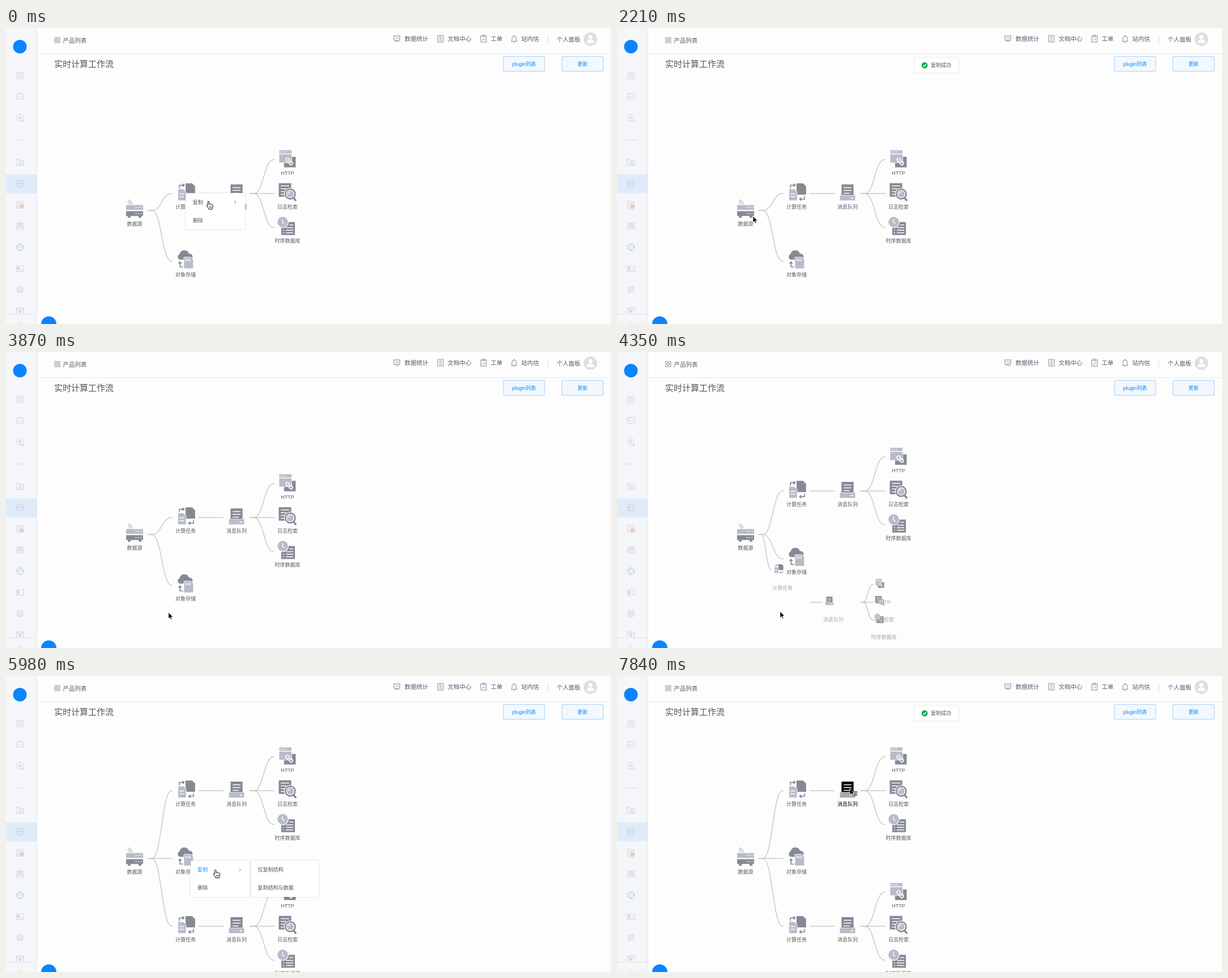
Write an HTML page that moves like this. It is 1068 by 524 pixels and loops after 7.99 s.

```html
<!DOCTYPE html>
<html>
<head>
<meta charset="utf-8">
<title>实时计算工作流</title>
<style>
  html, body { margin: 0; width: 100%; height: 100%; overflow: hidden; background: #fdfdfd; }
  svg { display: block; width: 100%; height: 100%; }
  text { font-family: "Liberation Sans", "Noto Sans CJK SC", "Noto Sans CJK", sans-serif; }
  .node { color: #858994; --light: #b8bcc9; fill: #5a5a5a; }
  .node.hot { color: #000; --light: #a4a8b5; fill: #000; }
  .d { fill: currentColor; }
  .l { fill: var(--light); }
  .dl { fill: none; stroke: currentColor; stroke-width: 1.7; }
  .ll { fill: none; stroke: var(--light); stroke-width: 1.6; stroke-linecap: round; }
  .wl { fill: none; stroke: #fff; stroke-width: 1.5; }
  .thick { stroke-width: 3.4; }
  .ring { stroke-width: 2.5; }
  .edge { stroke: #fdfdfd; stroke-width: .8; }
  .link { fill: none; stroke: #cacaca; stroke-width: 1.5; }
  .side, .head { fill: none; stroke: #c3c7d0; stroke-width: .75; }
  .head { stroke: #757b8b; stroke-width: .9; }
  .warm { stroke: #e59a80; }
  .green { stroke: #8fc79b; }
  .white { fill: #fff; }
  .panel { fill: #fff; filter: drop-shadow(0 .7px 1.8px rgba(0, 0, 0, .17)); }
  .item { fill: #555; stroke: #555; }
  .item text { stroke: none; }
  .item.on { fill: #1890ff; stroke: #1890ff; }
</style>
</head>
<body>
<svg id="stage" viewBox="0 0 1068 524" xmlns="http://www.w3.org/2000/svg"></svg>
<script>
const LOOP = 7990;
const stage = document.getElementById('stage');

const text = (x, cy, s, size = 9, fill = '', extra = '') =>
  `<text x="${x}" y="${cy + size * .37}" font-size="${size}" ${fill && `fill="${fill}"`} ${extra}>${s}</text>`;
const mid = 'text-anchor="middle"';
const rect = (x, y, w, h, attrs = '') => `<rect x="${x}" y="${y}" width="${w}" height="${h}" ${attrs}/>`;
const circle = (x, y, r, attrs = '') => `<circle cx="${x}" cy="${y}" r="${r}" ${attrs}/>`;
const path = (d, cls = '') => `<path d="${d}" class="${cls}"/>`;
const at = (x, y, cls, body) => `<g transform="translate(${x} ${y})" class="${cls}">${body}</g>`;

// ---------- static page ----------
const sideIcons = [
  [84, circle(-3, -3.2, 2.7) + rect(1.3, -6, 5, 5, 'rx="1"') + rect(-6, 1.3, 5, 5, 'rx="1"') + circle(3.8, 3.8, 2.6)],
  [121, rect(-6.5, -4.5, 13, 9.5, 'rx="1"') + path('M-2-6.5V-4.5M2-6.5V-4.5M-4 2L-2.5-1-1 2M1 0H4')],
  [159, circle(-.5, -.5, 6) + path('M4 4L7 6H1') + path('M1-2.5Q-2-3.5-1.5-1T1 .5-2 2', 'warm')],
  [238, path('M-6.5 5.5V-5.5H-2L-.5-3.5H6.5V5.5ZM-4-1H4M-3 1.5H4M-3 3.5H4')],
  [275.5, path('M-5-2V-5.5H5V-2M-5 2V5.5H5V2M-6.5-1.5H-2.5V1.5H-6.5ZM2.5-1.5H6.5V1.5H2.5ZM-2 0H2M-2-5.5V-3.5M2 5.5V3.5')],
  [313, path('M2 6H-6V-6H5V-1M-3.5-3H3M-3.5 0H0M-3.5 3H-1') + `<g class="warm">${circle(3, 3, 3.3, 'fill="#f6dcd2"')}${path('M3 1V3H5')}</g>`],
  [350.5, path('M-6.5 0V5.5H6.5V0M-5.5 0V-5.5H5.5V0M-6.5 2H-2L-1 3.5H1L2 2H6.5') + rect(-2.5, -3.5, 5, 3.5, 'class="warm"')],
  [388, `<g class="green">${circle(0, 0, 6)}${path('M-5.5-2Q-1-1-2 1T1 5.5M0-6Q-1-2 2-2T5.5 1')}</g>`],
  [426, rect(-6.5, -5, 13, 10) + path('M0 2H4') + `<g class="warm">${circle(-3, -1, 1.2, 'fill="#e59a80"')}${path('M-5 2.5H-2')}</g>`],
  [463, rect(-4.5, -4.5, 9, 9, 'rx="1"') + rect(-2, -2, 4, 4) + path('M-2.5-4.5V-6.5M2.5-4.5V-6.5M-2.5 4.5V6.5M2.5 4.5V6.5M-4.5-2.5H-6.5M-4.5 2.5H-6.5M4.5-2.5H6.5M4.5 2.5H6.5')],
  [501, path('M-6 5.5V-5.5H6V5.5M-6-3H6') + path('M-1-1.2L2 .8-1 2.8Z', 'warm')]
];

const headIcons = [
  [90.5, 21.5, [[-4.8, -4.8], [.8, -4.8], [-4.8, .8], [.8, .8]].map(([x, y]) => rect(x, y, 4, 4, 'rx="1"')).join('')],
  [690, 19, path('M-6-5H6M-5-5V3H5V-5M-2.5 0L-.5-2 1 0 3-2M0 3L-3 6M0 3L3 6')],
  [767, 19, rect(-5, -6, 10, 12, 'rx=".5"') + path('M-2.5-3H2.5M-2.5 0H2.5M-2.5 3H2.5')],
  [843, 19, path('M-2-5H-5V6H5V-5H2M-2-6.5H2V-3.5H-2ZM-2.5 1L-.5 3 3-1')],
  [897, 19.5, path('M-5 4H5L3.8 2V-1.5A3.8 3.8 0 0 0-3.8-1.5V2ZM0-7V-5.5M-1.5 6H1.5')]
];
const headLabels = [[703.5, '数据统计'], [779.5, '文档中心'], [855.5, '工单'], [909.5, '站内信']];

const button = (x, label) => rect(x, 50.4, 73, 26.3, 'rx="1.5" fill="#f2f8fe" stroke="#8fc6fb" stroke-width=".8"')
  + text(x + 36.5, 63.3, label, 9, '#0a84ff', mid + ' font-weight="500"');

const page = rect(0, 0, 1068, 524, 'fill="#fdfdfd"')
  + rect(0, 0, 54, 524, 'fill="#f4f6fa"') + rect(0, 259, 54, 33.5, 'fill="#dfebf9"')
  + rect(54, 0, 1, 524, 'fill="#e3e7ee"') + rect(55, 45, 1013, 1, 'fill="#e6e8ed"')
  + circle(24.5, 33, 12, 'fill="#0a84ff"')
  + sideIcons.map(([y, body]) => at(24.7, y, 'side', body)).join('')
  + rect(14, 197.7, 22, 1, 'fill="#dadde4"')
  + rect(0, 506, 54, 18, 'fill="#f4f6fa"') + rect(0, 506, 54, 1, 'fill="#dfe3ea"')
  + path('M21 521L24 524M25 521L28 524', 'side')
  + circle(75.5, 524, 13.5, 'fill="#0a84ff"')
  + headIcons.map(([x, y, body]) => at(x, y, 'head', body)).join('')
  + text(100.5, 21.8, '产品列表', 10.5, '#555b6c')
  + headLabels.map(([x, s]) => text(x, 18.8, s, 10.5, '#555b6c')).join('')
  + rect(956, 14, 1, 12, 'fill="#d5d8de"') + text(972, 19.8, '个人面板', 10.5, '#555b6c')
  + circle(1031.7, 19.7, 12, 'fill="#dedede"') + circle(1031.7, 16, 3.6, 'fill="#fff"')
  + path('M1024.5 26.5Q1025 20.5 1031.7 20.5T1039 26.5Z', 'white')
  + text(85, 63.4, '实时计算工作流', 15, '#555')
  + button(878, 'plugin列表') + button(981.3, '更新');

// ---------- workflow nodes ----------
const icons = {
  source: path('M-11.5-18.5A8 8 0 0 1-4.5-11.5M-11.5-14.8A4.5 4.5 0 0 1-8-11', 'll')
    + rect(-15, -9.5, 30, 8.5, 'class="l" rx=".7"') + rect(-15, 1.2, 30, 8.6, 'class="d" rx=".7"')
    + rect(-12, 9.5, 5, 3.3, 'class="d"') + rect(7, 9.5, 5, 3.3, 'class="d"')
    + [-5.2, 5.5].map(y => path(`M1.5 ${y}h2M6 ${y}h2M10.5 ${y}h2`, 'wl')).join(''),
  task: path('M0-18H11.5L16.8-12.7V2H0Z', 'd') + path('M-13.5-8H-4L1-3V12.5H-13.5Z', 'l edge')
    + path('M-11 .5H-2.5M-11 5.5H-2.5', 'wl')
    + path('M-10.8-9.5V-14.7H-5M14 4.8V10H8', 'dl') + path('M-5.5-18.3L-1-14.7-5.5-11.2ZM8.5 6.5L4 10 8.5 13.5Z', 'd'),
  queue: path('M-11 0H11L13.5 4.5V12.2H-13.5V4.5Z', 'l') + rect(-11, -16.5, 22, 19.5, 'class="d edge"')
    + path('M-7-10.5H7M-7-5.5H7M-7-.5H4M5 8H10', 'wl'),
  http: rect(-6.2, -5, 20.6, 18.6, 'class="d"') + rect(-15, -17, 22.3, 22.8, 'class="l edge"')
    + path('M-12.5-13.5h2M-8.5-13.5h2M-4.5-13.5h2M-15-10H7', 'wl')
    + `<g transform="translate(3 3.5) rotate(45) scale(1.1)">${path('M-1-2.5H-4A2.5 2.5 0 0 0-4 2.5H0M1 2.5H4A2.5 2.5 0 0 0 4-2.5H0M-2.5 0H2.5', 'wl')}</g>`,
  log: rect(-15.5, -18.3, 22, 24, 'class="d"') + path('M-12-13.5H3M-12-8.5H-2M-12-3.5H-5M-12 1.5H-6', 'wl')
    + circle(4.8, .8, 10.9, 'fill="#fdfdfd"') + path('M10.5 7.5L15 13', 'dl thick')
    + circle(4.8, .8, 8.6, 'class="dl ring"') + circle(4.8, .8, 6, 'class="l"')
    + path('M1.3 .5A3.5 3.5 0 0 1 4.8-3', 'wl'),
  db: rect(-11, -9.5, 24, 23, 'class="d"') + path('M-8 .5h2M-3 .5H10M-8 5h2M-3 5H10M-8 9.5h2M-3 9.5H10M3-4.5H10', 'wl')
    + circle(-8.5, -9.5, 10.5, 'fill="#fdfdfd"') + circle(-8.5, -9.5, 9.3, 'class="l"') + path('M-8.8-14.5V-9L-5.5-6.5', 'wl'),
  store: path('M-10-3A5 5 0 0 1-10.5-12.5A8.5 8.5 0 0 1 6-13.5A5.3 5.3 0 0 1 8-3Z', 'd')
    + path('M-3-7.5H9.5L13.8-3V13H-3Z', 'l edge')
    + path('M.8-4.5V0M4.3-4.5V0M7.8-4.5V0', 'wl')
    + path('M-9.8 2V10H-4.5', 'dl') + path('M-13.3 4L-9.8-.3-6.3 4Z', 'd')
};

// x, y before, y after; a node with a birth point [x, y] grows out of it
const nodes = [
  { icon: 'source', label: '数据源', x: 227, y: 323, to: 323 },
  { icon: 'task', label: '计算任务', x: 317, y: 293, to: 203 },
  { icon: 'store', label: '对象存储', x: 317, y: 413, to: 323 },
  { icon: 'queue', label: '消息队列', x: 407, y: 293, to: 203 },
  { icon: 'http', label: 'HTTP', x: 497, y: 233, to: 143 },
  { icon: 'log', label: '日志检索', x: 497, y: 293, to: 203 },
  { icon: 'db', label: '时序数据库', x: 497, y: 353, to: 263 },
  { icon: 'task', label: '计算任务', x: 317, to: 443, birth: [265, 339] },
  { icon: 'queue', label: '消息队列', x: 407, to: 443, birth: [355, 457] },
  { icon: 'http', label: 'HTTP', x: 497, to: 383, birth: [443, 457] },
  { icon: 'log', label: '日志检索', x: 497, to: 443, birth: [443, 457] },
  { icon: 'db', label: '时序数据库', x: 497, to: 503, birth: [443, 457] }
];
const links = [[0, 1], [0, 2], [1, 3], [3, 4], [3, 5], [3, 6], [0, 7], [7, 8], [8, 9], [8, 10], [8, 11]];

// ---------- menus ----------
const copyItems = ['复制>', '删除'];
const copyKinds = ['仅复制结构', '复制结构与数据'];
const panels = [
  { x: 317.5, y: 292.2, w: 104.3, h: 64, items: copyItems, show: [0, 1290], on: [[150, 0]] },
  { x: 424, y: 292.2, w: 120.3, h: 64, items: copyKinds, show: [290, 1290], on: [[700, 0], [950, 1]] },
  { x: 233, y: 323.3, w: 103.8, h: 158, items: ['导出任务>', '计算任务', '查看数据', '复制>', '粘贴'], show: [2500, 3570], on: [[2600, 0], [3200, 3], [3350, 4]] },
  { x: 339.3, y: 323.3, w: 118, h: 124, items: ['导出至 HTTP', '导出至日志检索服务', '导出至时序数据库', '导出至对象存储'], show: [2640, 3200], on: [] },
  { x: 326, y: 327, w: 104, h: 64, items: copyItems, show: [5680, 7190], on: [[5800, 0]] },
  { x: 432.3, y: 327, w: 120.3, h: 64, items: copyKinds, show: [5900, 7190], on: [[6300, 0], [6700, 1]] }
];
const panelMarkup = ({ x, y, w, h, items }) => {
  const step = h / items.length;
  const rows = items.map((s, i) => {
    const cy = y + step * (i + .5);
    const arrow = s.endsWith('>') ? `<path d="M${x + 85.5} ${cy - 2.7}l2.8 2.7-2.8 2.7" fill="none" stroke-width=".9"/>` : '';
    return `<g class="item">${text(x + 12.3, cy, s.replace('>', ''))}${arrow}</g>`;
  });
  return `<g class="menu">${rect(x, y, w, h, 'rx="2" class="panel"')}${rows.join('')}</g>`;
};

const toastMarkup = `<g id="toast">${rect(526, 53, 77, 26, 'rx="2" class="panel"')}${circle(543, 66, 5.4, 'fill="#10ab55"')}
  ${path('M540.5 66L542.3 67.9 545.7 64.3', 'wl')}${text(554, 66, '复制成功', 9, '#555')}</g>`;

// ---------- cursors: time, x, y, shape from that time on ----------
const cursorKeys = [
  [0, 357.7, 306.8, 'hand'], [150, 359, 307, 'hand'], [450, 395, 308, 'hand'], [730, 440, 311, 'hand'],
  [1000, 473.3, 337.2, 'hand'], [1290, 473.3, 337.2, 'arrow'], [2210, 240, 333, 'arrow'],
  [2360, 233, 324, 'context'], [2500, 233, 324, 'hand'], [2650, 252, 340, 'hand'], [2795, 275, 365, 'hand'],
  [3080, 283, 422, 'hand'], [3110, 283, 422, 'hand'], [3280, 285, 452, 'hand'],
  [3430, 286.4, 461.6, 'hand'], [3570, 286.4, 461.6, 'arrow'], [4490, 288, 459, 'arrow'],
  [4930, 325, 328.3, 'context'], [5680, 326, 328, 'hand'], [5960, 369.8, 343.3, 'hand'], [6115, 369.8, 343.3, 'hand'],
  [6600, 468, 347, 'hand'], [6750, 478, 364, 'hand'], [6900, 482, 371, 'hand'], [7190, 482, 371, 'arrow'],
  [7760, 411, 199, 'context'], [LOOP, 411, 199, 'context']
];
const arrow = '<path d="M0 0V11.4L2.6 9 4.3 12.8 6.1 12 4.5 8.3H8Z" stroke="#fff" stroke-width=".8"/>';
const cursorMarkup = {
  hand: '<path d="M-1.3 1.2a1.3 1.3 0 0 1 2.6 0V5.3q1.2-.9 2.3 0 1.2-.8 2.1.2 1.6-.4 1.8 1.2V10q-.2 1.5-1 2.4V14H.2V12.8L-3 9q-1.3-2 .1-2.4 .8-.2 1.6 1Z" fill="#fff" stroke="#000"/>'
    + '<path d="M1.6 8.7V11.7M3.4 8.7V11.7M5.1 8.7V11.7" stroke="#000" stroke-width=".7"/>',
  arrow,
  context: rect(4.8, 5.4, 7.4, 7, 'fill="#fff" stroke="#000" stroke-width=".8"')
    + '<path d="M6.3 7.5H11M6.3 9H11M6.3 10.6H11" stroke="#000" stroke-width=".8"/>' + arrow
};

stage.innerHTML = page
  + links.map(() => path('', 'link')).join('')
  + nodes.map(n => `<g class="node"><g class="icon">${icons[n.icon]}</g>${text(0, 24, n.label, 9, '', mid)}</g>`).join('')
  + panels.map(panelMarkup).join('') + toastMarkup
  + Object.entries(cursorMarkup).map(([k, s]) => `<g id="${k}">${s}</g>`).join('');

const all = sel => [...stage.querySelectorAll(sel)];
const linkEls = all('.link'), nodeEls = all('.node'), menuEls = all('.menu');
const toast = stage.querySelector('#toast');
const cursors = Object.keys(cursorMarkup).map(k => stage.querySelector('#' + k));

// ---------- motion ----------
const clamp = v => Math.min(1, Math.max(0, v));
const lerp = (a, b, p) => a + (b - a) * p;
const cubic = p => p < .5 ? 4 * p ** 3 : 1 - 4 * (1 - p) ** 3;
const show = (el, on) => el.setAttribute('visibility', on ? 'visible' : 'hidden');

// the screen refreshes in bursts: first step, last step, count
const bursts = [[150, 1000, 6], [1290, 2210, 7], [2360, 3280, 7], [3430, 4350, 7],
  [4490, 5530, 8], [5680, 6600, 7], [6750, 6900, 2], [7190, 7840, 5]];
const ticks = [0, ...bursts.flatMap(([a, b, n]) =>
  Array.from({ length: n }, (_, i) => i === n - 1 ? b : a + 145 * i))];
const snap = t => ticks.findLast(s => s <= t);

function drawTree(t) {
  const p = cubic(clamp((t - 3995) / 700));
  const hot = t >= 2360 && t < 2500 ? 0 : t >= 4930 && t < 5680 ? 2 : t >= 7760 ? 3 : -1;
  const yOf = n => n.birth ? n.to : lerp(n.y, n.to, p);

  nodes.forEach((n, i) => {
    const el = nodeEls[i], [icon, label] = el.children;
    const x = n.birth ? lerp(n.birth[0], n.x, p) : n.x;
    const y = n.birth ? lerp(n.birth[1], n.to, p) : yOf(n);
    el.setAttribute('transform', `translate(${x} ${y})`);
    el.classList.toggle('hot', i === hot);
    if (!n.birth) return;
    show(el, p > 0);
    icon.setAttribute('transform', `translate(-15 -17) scale(${p}) translate(15 17)`);
    label.setAttribute('opacity', p);
  });

  links.forEach(([a, b], i) => {
    const grow = nodes[b].birth ? p : 1;
    const x = nodes[a].x + 23, y = yOf(nodes[a]);
    const w = 44 * grow, ey = lerp(y, yOf(nodes[b]), grow);
    const c = x + w * .57;
    linkEls[i].setAttribute('d', `M${x} ${y}H${x + w * .17}C${c} ${y} ${c} ${ey} ${x + w * .96} ${ey}H${x + w}`);
    show(linkEls[i], grow > 0);
  });
}

function drawMenus(t) {
  panels.forEach((m, i) => {
    show(menuEls[i], t >= m.show[0] && t < m.show[1]);
    const key = m.on.findLast(k => k[0] <= t);
    menuEls[i].querySelectorAll('.item').forEach((el, j) => el.classList.toggle('on', !!key && key[1] === j));
  });
}

function drawToast(t) {
  const k = t < 5000 ? clamp((t - 1400) / 300) * (1 - clamp((t - 3000) / 180)) : clamp((t - 7300) / 300);
  toast.setAttribute('opacity', k);
  toast.setAttribute('transform', `translate(0 ${-7 * (1 - k)})`);
}

function drawCursor(t) {
  const i = cursorKeys.findLastIndex(k => k[0] <= t);
  const a = cursorKeys[i], b = cursorKeys[i + 1] || a;
  const u = clamp((t - a[0]) / (b[0] - a[0] || 1)), p = u * u * (3 - 2 * u);
  cursors.forEach(el => {
    show(el, el.id === a[3]);
    el.setAttribute('transform', `translate(${lerp(a[1], b[1], p)} ${lerp(a[2], b[2], p)})`);
  });
}

const start = performance.now();
function frame() {
  const t = snap((performance.now() - start) % LOOP);
  drawTree(t);
  drawMenus(t);
  drawToast(t);
  drawCursor(t);
  requestAnimationFrame(frame);
}
frame();
</script>
</body>
</html>
```
